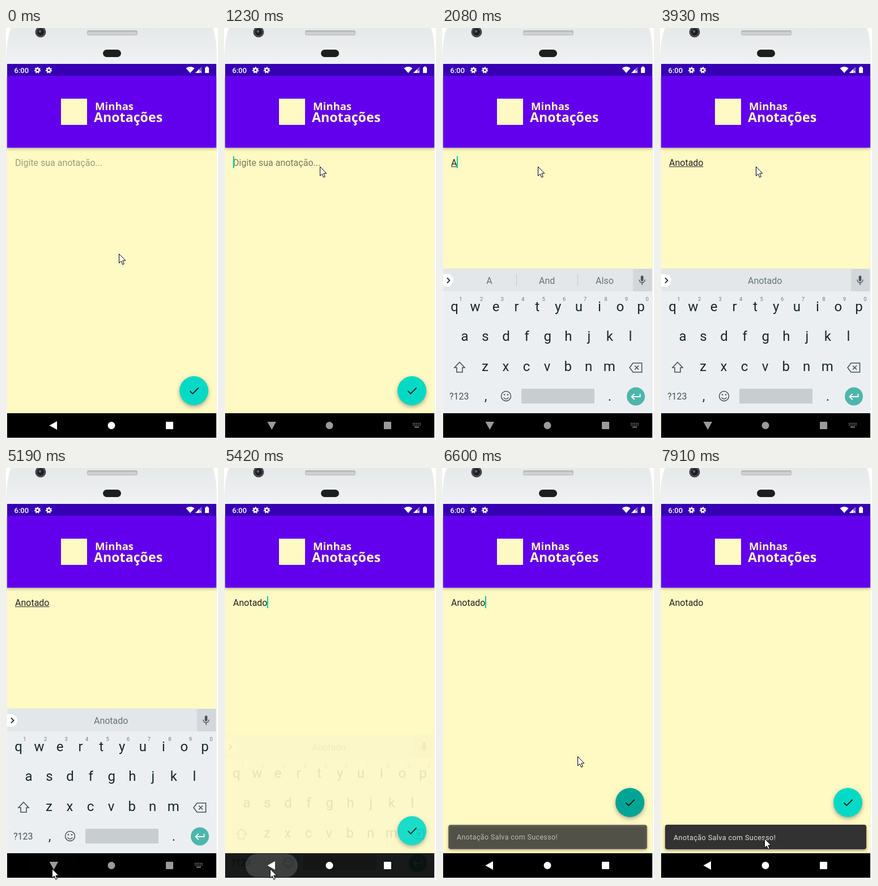
An HTML page with a canvas that plays this animation: 374 by 723 pixels, repeating every 7.99 s.

```html
<!DOCTYPE html>
<html lang="pt-BR">
<head>
<meta charset="utf-8">
<style>
html, body { margin: 0; width: 374px; height: 723px; overflow: hidden; background: #fff }
canvas { display: block }
</style>
</head>
<body>
<canvas id="stage" width="374" height="723"></canvas>
<script>
const LOOP = 7990;
const stage = document.getElementById('stage').getContext('2d');
const layer = Object.assign(document.createElement('canvas'), { width: 374, height: 723 }).getContext('2d');
let c = stage;

const ramp = (t, a, b) => Math.min(1, Math.max(0, (t - a) / (b - a)));
const smooth = p => p * p * (3 - 2 * p);
const easeOut = p => 1 - (1 - p) * (1 - p);
const latest = (list, t) => list.filter(item => item[0] <= t).pop();

// Drawing helpers
function rect(x, y, w, h, fill, r = 0) {
  c.fillStyle = fill;
  c.beginPath();
  c.roundRect(x, y, w, h, r);
  c.fill();
}
function disc(x, y, r, fill) {
  c.fillStyle = fill;
  c.beginPath();
  c.arc(x, y, r, 0, 7);
  c.fill();
}
function fillPath(d, fill) {
  c.fillStyle = fill;
  c.fill(new Path2D(d));
}
function line(d, color, width = 1.6) {
  c.strokeStyle = color;
  c.lineWidth = width;
  c.stroke(new Path2D(d));
}
function text(s, x, y, size, fill, align = 'left', weight = 400, family = 'Roboto') {
  c.font = `${weight} ${size}px ${family}, sans-serif`;
  c.textAlign = align;
  c.fillStyle = fill;
  c.fillText(s, x, y);
}
function shadow(color, blur, y) {
  c.shadowColor = color;
  c.shadowBlur = blur;
  c.shadowOffsetY = y;
}
const noShadow = () => shadow('transparent', 0, 0);

// [time, typed text, suggestions]
const typing = [
  [0, '', ['I', 'The', "I'm"]],
  [2080, 'A', ['A', 'And', 'Also']],
  [2460, 'Ano', ['Ano', 'And', 'Any']],
  [3010, 'Anot', ['Anot', 'Another', 'Annotate']],
  [3090, 'Anota', ['', 'Anota', '']],
  [3240, 'Anotad', ['', 'Anotad', '']],
  [3410, 'Anotado', ['', 'Anotado', '']]
];
const caretFlips = [1070, 1770, 2080, 3930, 4400, 4870, 5300, 5790, 6260, 6740, 7220, 7700];

// [time, x, y]
const pointerKeys = [
  [0, 199, 396], [290, 199, 396], [1070, 169, 243], [4180, 169, 243],
  [4950, 75, 704], [5040, 81, 703], [5480, 81, 703], [6280, 326, 628],
  [6440, 326, 628], [6600, 239, 506], [7540, 239, 506], [7910, 184, 650], [LOOP, 184, 650]
];

function drawPhone() {
  rect(0, 0, 374, 723, '#fff');
  const body = c.createLinearGradient(0, 0, 0, 63);
  body.addColorStop(0, '#e6e9ea');
  body.addColorStop(1, '#eff1f2');
  fillPath('M0 723V58Q1 18 9 0H365Q372 18 372 58V723Z', body);
  disc(61, 7, 9.5, '#45474a');
  disc(61, 7, 6, '#1c1d20');
  disc(60, 6, 2.4, '#5b5e66');
  rect(143, 4, 89, 9, '#b9bbbc', 3);
  rect(144, 7, 87, 5, '#cfd1d1', 2);
  rect(171, 38, 32, 13, '#1d1e20', 6.5);
}

function gear(x, y) {
  c.setLineDash([2.1, 2.1]);
  line(`M${x + 4.7} ${y}a4.7 4.7 0 1 1-9.4 0a4.7 4.7 0 1 1 9.4 0`, '#fff', 2);
  c.setLineDash([]);
  line(`M${x + 3} ${y}a3 3 0 1 1-6 0a3 3 0 1 1 6 0`, '#fff', 2.4);
}

function drawHeader() {
  shadow('rgba(0,0,0,.3)', 5, 2);
  rect(2, 84, 369, 126, '#6200ee');
  noShadow();
  rect(2, 63, 369, 21, '#3700b3');
  text('6:00', 14.5, 78.5, 13, '#fff', 'left', 500);
  gear(55.5, 74);
  gear(75.5, 74);
  fillPath('M325 79L317.5 70.5Q325 65 332.5 70.5Z', '#fff');
  fillPath('M345 68V79H334Z', 'rgba(255,255,255,.4)');
  fillPath('M341 72V79H334Z', '#fff');
  line('M341 75l4 4m0-4l-4 4', '#fff', 1);
  rect(351, 69, 7, 10, '#fff', 1);
  rect(353, 67.5, 3, 2, '#fff');

  rect(97, 124, 46, 46, '#fff9c4');
  text('Minhas', 157, 144, 18.6, '#fff9c4', 'left', 600, 'Noto Sans');
  text('Anotações', 155, 165, 23.2, '#fff9c4', 'left', 700, 'Noto Sans');
}

function drawNote(t, typed, composing) {
  if (!typed) text('Digite sua anotação...', 16, 242, 16, `rgba(0,0,0,${t < 1070 ? .38 : .52})`);
  text(typed, 16, 242, 16, '#22211c');
  c.font = '400 16px Roboto, sans-serif';
  const width = c.measureText(typed).width;
  if (typed && composing) rect(16, 243, width, 1, '#33322a');
  if (caretFlips.filter(f => f <= t).length % 2) rect(16 + Math.round(width), 225, 2, 21, '#03cfb4');
}

function drawButton(y, pressed) {
  shadow('rgba(0,0,0,.32)', 7, 3);
  disc(331.5, y, 25.5, '#03dac5');
  noShadow();
  line(`M324.5 ${y + .5}l4.8 4.8L339.5 ${y - 5}`, '#0b1a18', 1.8);
  disc(331.5, y, 25.5, `rgba(0,0,0,${.25 * pressed})`);
}

function keyRow(keys, x, y) {
  [...keys].forEach((key, i) => text(key, x + i * 36.55, y, 24, '#16272e', 'center'));
}

function drawKeys(words) {
  const ink = '#44545b';
  rect(2, 422, 369, 254, '#eceff1');
  rect(2, 422, 369, 40, '#e3e7e9');
  rect(337, 423, 33, 39, '#d3d7d9');
  rect(-10, 432, 30, 22, '#fff', 11);
  line('M9 438.5l4.5 4.5l-4.5 4.5', '#263238', 1.8);
  words.forEach((word, i) => text(word, 83.5 + i * 101.7, 449, 16, '#66747a', 'center'));
  if (words[0]) [131, 239].forEach(x => rect(x, 432, 1, 21, '#c3cacd'));
  rect(350.7, 434.5, 4.6, 10, ink, 2.3);
  line('M348 441.5c0 7 10 7 10 0M353 447v4', ink, 1.4);

  keyRow('qwertyuiop', 22, 497);
  [...'1234567890'].forEach((n, i) => text(n, 33 + i * 36.55, 479, 9.5, '#6d7a80', 'center'));
  keyRow('asdfghjkl', 40, 549);
  keyRow('zxcvbnm', 76, 602);
  line('M31 586.5L40 596H36V604H26V596H22Z', ink);
  line('M331 596L337 588H352.5V604H337ZM340 592.5l7 7m0-7l-7 7', ink);

  text('?123', 13, 652, 16, ink);
  text(',', 77, 654, 24, '#263238', 'center');
  text('.', 296, 654, 24, '#263238', 'center');
  line('M121.5 646a8.5 8.5 0 1 1-17 0a8.5 8.5 0 1 1 17 0M108.5 648.5q4.5 5 9 0', ink, 1.5);
  disc(110, 643.5, 1.3, ink);
  disc(116, 643.5, 1.3, ink);
  rect(140, 633, 129, 26, '#c8cdd0', 2);
  disc(342, 646.5, 16, '#4db6ac');
  line('M349.5 642v5H334.5m5-5l-5 5l5 5', '#fff', 1.8);
}

function drawKeyboard(words, shown, drop) {
  layer.clearRect(0, 0, 374, 723);
  c = layer;
  drawKeys(words);
  c = stage;
  c.save();
  c.beginPath();
  c.rect(2, 63, 369, 656);
  c.clip();
  c.globalAlpha = shown;
  c.drawImage(layer.canvas, 0, drop);
  c.restore();
}

function drawNav(typingMode, ripple) {
  const ink = typingMode ? '#9b9b9b' : '#fff';
  rect(38, 677, 92, 41, `rgba(255,255,255,${.16 * ripple})`, 20.5);
  fillPath(typingMode ? 'M76.5 691H92L84.3 705Z' : 'M76.5 697.5L90 690V705Z', ink);
  disc(186, 697.5, 6.5, ink);
  rect(282, 691, 13, 13, ink, 1);
  if (!typingMode) return;
  for (let i = 0; i < 10; i++) rect(333 + i % 5 * 3, 693 + (i > 4) * 3, 1.6, 1.6, ink);
  rect(336, 699.5, 8, 1.6, ink);
}

function drawSnackbar(p) {
  if (!p) return;
  const scale = .8 + .2 * easeOut(p);
  c.save();
  c.globalAlpha = p;
  c.translate(186.5, 647.5);
  c.scale(scale, scale);
  c.translate(-186.5, -647.5);
  shadow('rgba(0,0,0,.4)', 5, 2);
  rect(9, 626, 355, 43, '#323232', 4);
  noShadow();
  c.letterSpacing = '.4px';
  text('Anotação Salva com Sucesso!', 24, 652.5, 12.6, '#e0dfd8');
  c.restore();
}

function drawPointer(t) {
  const i = pointerKeys.findIndex(key => key[0] > t);
  const [t0, x0, y0] = pointerKeys[i - 1], [t1, x1, y1] = pointerKeys[i];
  const p = smooth(ramp(t, t0, t1));
  c.save();
  c.translate(Math.round(x0 + (x1 - x0) * p) + .5, Math.round(y0 + (y1 - y0) * p) + .5);
  const arrow = 'M0 0V16L3.7 12.6L6.2 18.5L8.8 17.4L6.3 11.6H11.3Z';
  fillPath(arrow, '#fff');
  line(arrow, '#000', 1);
  c.restore();
}

function draw(t) {
  const [, typed, words] = latest(typing, t);
  const hide = ramp(t, 5300, 5435);
  const rise = easeOut(ramp(t, 1270, 1450));
  const shown = t < 5300 ? rise : 1 - hide;
  const drop = t < 5300 ? 59 * (1 - rise) : 52 * hide;
  const snack = ramp(t, 6489, 6639);

  drawPhone();
  rect(2, 63, 369, 613, '#fff9c4');
  drawHeader();
  drawNote(t, typed, t < 5300);
  drawButton(snack ? 587 : 636.5, ramp(t, 6320, 6400) * (1 - ramp(t, 6600, 6830)));
  drawSnackbar(snack);
  rect(2, 676, 369, 43, '#000');
  if (shown) drawKeyboard(words, shown, drop);
  drawNav(t >= 1150 && t < 5300, ramp(t, 5190, 5270) * (1 - ramp(t, 5480, 5800)));
  drawPointer(t);
}

function tick() {
  draw(performance.now() % LOOP);
  requestAnimationFrame(tick);
}
tick();
</script>
</body>
</html>
```
